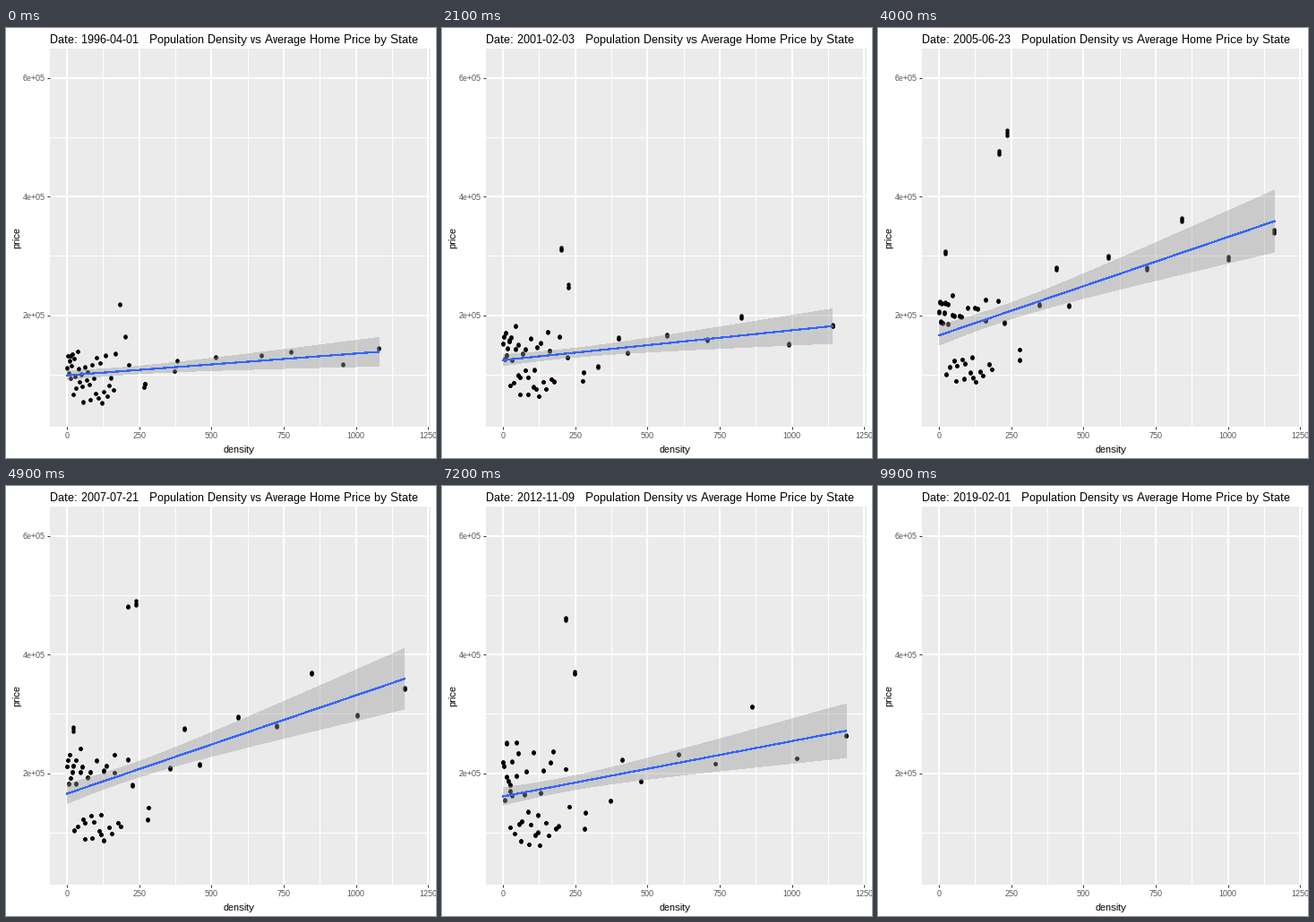
Animation of 480x480 px, one loop 10000 ms. Source, as a matplotlib script:

```python
import matplotlib.pyplot as plt
import numpy as np
from matplotlib.animation import FuncAnimation
from matplotlib.patches import Polygon
from matplotlib.ticker import FixedLocator, FuncFormatter

SIZE, DPI, FRAMES, STEP = 480, 72, 100, 100
plt.rcParams.update({
    "font.family": "Liberation Sans",
    "text.hinting": "native",
    "text.hinting_factor": 1,
})

# Points that stand apart from the crowd:
# density in 1996 and 2016, price in 1996 and 2016, height of the boom (thousands).
LANDMARKS = [
    (14, 26, 131, 223, 147), (183, 220, 218, 554, 85), (201, 251, 163, 469, 208),
    (214, 230, 116, 161, 55), (267, 283, 78, 119, 28), (269, 285, 85, 152, 24),
    (270, 381, 84, 187, 91), (372, 484, 106, 215, 59), (381, 415, 123, 259, 96),
    (515, 615, 129, 260, 115), (673, 739, 132, 226, 113), (775, 868, 138, 348, 127),
    (955, 1020, 117, 238, 133), (1079, 1195, 144, 278, 146),
]


def crowd(n=36):
    """Sparse regions: evenly scattered, dearer where density is low."""
    k = np.arange(n)
    u, v, w = ((k + 1) * s % 1 for s in (.618, .414, .732))
    d0 = 1 + 2.5 * k + .064 * k ** 2
    d1 = d0 * (1.06 + .3 * v)
    dear = u < .25 + .75 * np.exp(-d0 / 45)
    p0 = np.where(dear, 90 + 50 * v, 52 + 45 * v)
    p1 = p0 + np.where(dear, 60 + 120 * w, 32 + 30 * w)
    boom = np.where(dear, 60, 22) * (1 - w)
    return np.column_stack([d0, d1, p0, p1, boom])


def growth(t):
    """Density moves once a year, with a jump at the 2000 census."""
    return np.interp(np.floor(t + 1e-6), (1996, 1999, 2000, 2005, 2012, 2016, 2018),
                     (0, .12, .48, .7, .93, 1, 1.04))


def trend_at(t):
    return np.interp(t, (1996.25, 2001.1, 2005.5, 2009.4, 2012.2, 2016.55, 2018.95),
                     (0, .28, .55, .68, .71, 1, 1.2))


def bubble(t, hold):
    """Boom to 2006, then a bust that is milder where hold is high."""
    return np.interp(t, (2001.1, 2006.3, 2009.4, 2012.2, 2016.5),
                     (0, 1, .5 * hold, .4 * hold - .25, 0))


start, end = np.datetime64("1996-04-01"), np.datetime64("2019-02-01")
span = (end - start).astype(int)
months = np.arange("1996-04", "2019-01", dtype="datetime64[M]")
times = 1970 + months.astype(int) / 12
slots = np.rint((months.astype("datetime64[D]") - start).astype(int) / span * (FRAMES - 1))

density, price = [], []
for d0, d1, p0, p1, boom in np.vstack([LANDMARKS, crowd()]):
    density.append(d0 + (d1 - d0) * growth(times))
    swing = boom * bubble(times, min(d0 / 700, 1))
    price.append(1000 * (p0 + (p1 - p0) * trend_at(times) + swing))
density, price = np.array(density), np.array(price)

fig = plt.figure(figsize=(SIZE / DPI, SIZE / DPI), dpi=DPI, facecolor="white")
ax = fig.add_axes([49 / SIZE, 35 / SIZE, 425 / SIZE, 422 / SIZE], facecolor="#EBEBEB")
ax.set(xlim=(-58.8, 1258), ylim=(12300, 649300))
ax.set_axisbelow(True)
for side in ax.spines.values():
    side.set_visible(False)

ax.xaxis.set_major_locator(FixedLocator(range(0, 1251, 250)))
ax.xaxis.set_minor_locator(FixedLocator(range(125, 1250, 250)))
ax.yaxis.set_major_locator(FixedLocator([2e5, 4e5, 6e5]))
ax.yaxis.set_minor_locator(FixedLocator([1e5, 3e5, 5e5]))
ax.yaxis.set_major_formatter(FuncFormatter(lambda v, _: f"{v:.0e}"))
ax.grid(which="major", color="white", lw=2)
ax.grid(which="minor", color="white", lw=1)
ax.tick_params(which="major", length=3, width=1, pad=2, color="#333333",
               labelcolor="#4D4D4D", labelsize=9)
ax.tick_params(axis="x", which="major", pad=3.5)
ax.tick_params(which="minor", length=0)


def label(x, y, text, size, **kw):
    return fig.text(x / SIZE, 1 - y / SIZE, text, fontsize=size, color="black", **kw)


title = label(49, 17, "", 13)
label(260, 474, "density", 11, ha="center")
label(12, 234, "price", 11, ha="center", va="center", rotation=90)

dots, = ax.plot([], [], "o", color="black", ms=4.4, mew=0, zorder=3)
band = Polygon(np.zeros((3, 2)), fc="#999999", alpha=.4, lw=0, antialiased=False, zorder=4)
ax.add_patch(band)
line, = ax.plot([], [], color="#3366FF", lw=1.2, antialiased=False, zorder=5)


def fit(x, y):
    """Least-squares line with its 95% confidence half-width."""
    slope, base = np.polyfit(x, y, 1)
    sigma = np.sqrt(np.sum((y - base - slope * x) ** 2) / (x.size - 2))
    gx = np.linspace(x.min(), x.max(), 80)
    lever = (gx - x.mean()) ** 2 / np.sum((x - x.mean()) ** 2)
    return gx, base + slope * gx, 1.98 * sigma * np.sqrt(1 / x.size + lever)


def update(i):
    day = start + int(i * span / (FRAMES - 1))
    title.set_text(f"Date: {day}   Population Density vs Average Home Price by State")
    now = slots == i
    x, y = density[:, now].ravel(), price[:, now].ravel()
    dots.set_data(x, y)
    band.set_visible(x.size > 0)
    line.set_visible(x.size > 0)
    if x.size:
        gx, gy, half = fit(x, y)
        line.set_data(gx, gy)
        band.set_xy(np.column_stack([np.r_[gx, gx[::-1]],
                                     np.r_[gy + half, (gy - half)[::-1]]]))
    return title, dots, band, line


anim = FuncAnimation(fig, update, frames=FRAMES, interval=STEP, repeat=True, repeat_delay=0)
plt.show()
```
